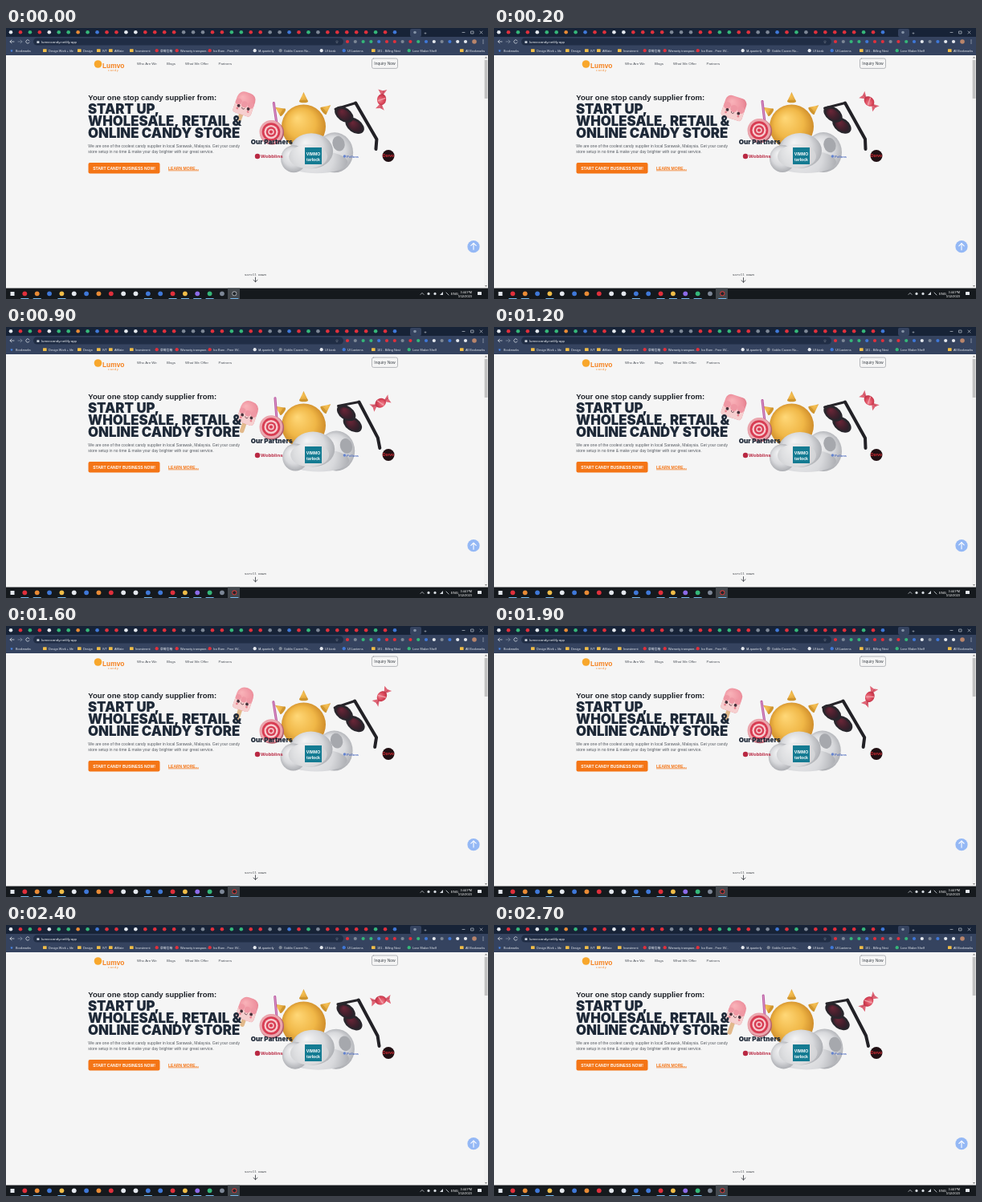
An HTML page with a canvas for the animation above (2.8 s loop, 600x338 px).

```html
<!DOCTYPE html>
<html lang="en">
<head>
<meta charset="utf-8">
<title>Candy supplier landing page</title>
<style>
html, body { margin: 0; width: 100%; height: 100%; overflow: hidden; background: #f5f5f5; }
canvas { display: block; width: 600px; height: 338px; }
</style>
</head>
<body>
<canvas id="stage"></canvas>
<script>
const W = 600, H = 338, LOOP = 2800, STEP = 100;
const canvas = document.getElementById('stage');
const ctx = canvas.getContext('2d');
const ratio = window.devicePixelRatio || 1;
canvas.width = W * ratio;
canvas.height = H * ratio;

const SANS = '"Liberation Sans", Arial, sans-serif';
const WIDE = 'Inter, sans-serif';
const MONO = '"Liberation Mono", monospace';
const mix = (a, b, k) => a + (b - a) * k;

function text(str, x, y, size, color, { weight = 400, family = SANS, align = 'left' } = {}) {
  ctx.font = `${weight} ${size}px ${family}`;
  ctx.textAlign = align;
  ctx.fillStyle = color;
  ctx.fillText(str, x, y);
}
function rect(x, y, w, h, color, radius = 0) {
  ctx.fillStyle = color;
  ctx.beginPath();
  ctx.roundRect(x, y, w, h, radius);
  ctx.fill();
}
function oval(x, y, rx, ry, fill, angle = 0) {
  ctx.fillStyle = fill;
  ctx.beginPath();
  ctx.ellipse(x, y, rx, ry, angle, 0, Math.PI * 2);
  ctx.fill();
}
const dot = (x, y, r, fill) => oval(x, y, r, r, fill);
function line(points, color, width) {
  ctx.strokeStyle = color;
  ctx.lineWidth = width;
  ctx.lineCap = ctx.lineJoin = 'round';
  ctx.beginPath();
  points.forEach(([x, y], i) => i ? ctx.lineTo(x, y) : ctx.moveTo(x, y));
  ctx.stroke();
}
function polygon(points, fill) {
  ctx.fillStyle = fill;
  ctx.beginPath();
  points.forEach(([x, y]) => ctx.lineTo(x, y));
  ctx.closePath();
  ctx.fill();
}
function shade(x, y, r, light, mid, dark) {
  const g = ctx.createRadialGradient(x - r * 0.3, y - r * 0.4, 0, x, y, r * 1.1);
  g.addColorStop(0, light);
  g.addColorStop(0.6, mid);
  g.addColorStop(1, dark);
  return g;
}
function placed(x, y, angle, draw) {
  ctx.save();
  ctx.translate(x, y);
  ctx.rotate(angle);
  draw();
  ctx.restore();
}

const ICON = { r: '#e0303c', g: '#35b779', w: '#e4e8ee', o: '#e98b35', b: '#3f78d8', n: '#7d8796', y: '#f0bd48', p: '#8c6be8' };
const TABS = 'wrgrwggogbrrwwrrrrnnnrrggrrnnbrgnrrrrrgrb';
const TASKS = 'wrobywborwwbbrypgnw';

function drawBrowser() {
  rect(0, 0, W, 11, '#172337');
  [...TABS].forEach((key, i) => dot(6 + i * 11.95, 5.3, 2.3, ICON[key]));
  rect(503, 1, 14, 10, '#35435f', 2);
  dot(509, 5.5, 1.8, '#8391a5');
  text('+', 522, 7.5, 6, '#d6dce5', { align: 'center' });
  line([[568, 5.5], [571, 5.5]], '#d6dce5', 0.6);
  ctx.strokeRect(579, 4, 3, 3);
  line([[590, 4], [593, 7]], '#d6dce5', 0.6);
  line([[593, 4], [590, 7]], '#d6dce5', 0.6);

  rect(0, 11, W, 23, '#35435f');
  rect(34, 12.5, 386, 9, '#202d45', 4.5);
  line([[5, 17], [10, 17]], '#e4e8ee', 0.7);
  line([[7, 15], [5, 17], [7, 19]], '#e4e8ee', 0.7);
  line([[15, 17], [20, 17]], '#8794a7', 0.7);
  line([[18, 15], [20, 17], [18, 19]], '#8794a7', 0.7);
  ctx.strokeStyle = '#e4e8ee';
  ctx.beginPath();
  ctx.arc(27, 17, 2.2, 0.5, 5.8);
  ctx.stroke();
  rect(38.4, 16.3, 3, 2.6, '#c9d0da', 0.5);
  text('lumvocandy.netlify.app', 44, 18.7, 4.4, '#eef1f5');
  text('☆', 412, 19, 5, '#d6dce5', { align: 'center', family: '"DejaVu Sans", sans-serif' });
  [...'rnggbrrnrgbwnbww'].forEach((key, i) => dot(425 + i * 9.8, 17, 2.1, ICON[key]));
  dot(583, 17, 2.8, '#b9856b');
  for (let i = 0; i < 3; i++) dot(594, 15 + i * 2, 0.6, '#e4e8ee');

  text('★', 7, 29.5, 5, '#4c8df5', { align: 'center', family: '"DejaVu Sans", sans-serif' });
  const marks = [
    [12, 'Bookmarks'], [53, 'Design Work + life', 'y'], [96, 'Design', 'y'], [120, 'IVT', 'y'],
    [135, 'Affilate', 'y'], [161, 'Investment', 'y'], [192, '草莓信箱', 'r'],
    [217, 'Warranty transpare...', 'r'], [258, 'Ico Barn - Free SV...', 'r'], [314, 'IA quarterly', 'w'],
    [346, 'Goblin Cavern No...', 'n'], [397, 'UI kiosk', 'w'], [425, 'UI Lanterns', 'b'],
    [462, '101 - Billing Nest', 'y'], [506, 'Lone Maker Shelf', 'g'], [572, 'All Bookmarks', 'y']
  ];
  for (const [x, label, key] of marks) {
    if (key === 'y') rect(x - 7, 26.3, 4.6, 3.7, ICON.y, 0.5);
    else if (key) dot(x - 4.3, 28.2, 2.1, ICON[key]);
    text(label, x, 29.5, 3.8, '#e4e8ee', { family: '"Liberation Sans", "Noto Sans CJK SC", "Noto Sans CJK", sans-serif' });
  }
  rect(595, 34, 5, 291, '#f1f1f1');
  rect(595.7, 40, 3.8, 48, '#c1c1c1');
  polygon([[596, 37.5], [599, 37.5], [597.5, 35.8]], '#777');
  polygon([[596, 321], [599, 321], [597.5, 322.8]], '#777');
}

function drawTaskbar(recording) {
  rect(0, 324.5, W, 13.5, '#15191d');
  rect(276, 324.5, 15, 13.5, '#43484d');
  [...TASKS].forEach((key, i) => {
    const x = 8 + i * 15.35;
    if (i === 0) rect(x - 2.5, 329, 5, 5, ICON.w);
    else if (i < TASKS.length - 1) dot(x, 331.3, 2.9, ICON[key]);
    else {
      dot(x, 331.3, 3, recording ? '#d93a3a' : '#a4a8ad');
      dot(x, 331.3, 2.1, '#20262c');
    }
    if ([1, 2, 4, 11, 13, 14, 15, 16, 18].includes(i)) rect(x - 5, 337, 10, 1, '#76b9ed');
  });
  line([[516, 332.4], [518, 330.4], [520, 332.4]], '#e4e8ee', 0.7);
  dot(526, 331.4, 1.6, '#d7dce2');
  dot(534, 331.4, 1.6, '#d7dce2');
  polygon([[540, 333], [544, 333], [544, 329]], '#d7dce2');
  line([[548, 330], [551, 333]], '#d7dce2', 0.8);
  text('ENG', 554, 333, 4.2, '#fff');
  text('3:44 PM', 580, 330.7, 3.9, '#fff', { align: 'right' });
  text('5/12/2023', 580, 336.2, 3.9, '#fff', { align: 'right' });
  rect(587, 329, 5, 4, '#e4e8ee', 0.6);
}

function drawCopy() {
  dot(114.5, 45, 4.8, '#f8a72c');
  text('Lumvo', 120, 49.7, 8.4, '#f58220', { weight: 700 });
  text('c a n d y', 127, 53.6, 3.4, '#f58220');
  [['Who Are We', 163], ['Blogs', 200], ['What We Offer', 223], ['Partners', 264.5]]
    .forEach(([label, x]) => text(label, x, 45.7, 4.4, '#4b5159'));
  ctx.strokeStyle = '#9a9da1';
  ctx.lineWidth = 0.7;
  ctx.beginPath();
  ctx.roundRect(455.5, 38, 32, 12.4, 2);
  ctx.stroke();
  text('Inquiry Now', 471.5, 46, 5, '#3d434a', { align: 'center' });

  text('Your one stop candy supplier from:', 102.3, 90.3, 9.5, '#1c2027', { weight: 700 });
  ['START UP,', 'WHOLESALE, RETAIL &', 'ONLINE CANDY STORE'].forEach((row, i) =>
    text(row, 102, 107 + i * 15, 16.8, '#1e2938', { weight: 900, family: WIDE }));
  text('We are one of the coolest candy supplier in local Sarawak, Malaysia. Get your candy', 102.3, 148.6, 5.04, '#565b62');
  text('store setup in no time & make your day brighter with our great service.', 102.3, 156.2, 5.04, '#565b62');
  rect(102.5, 168, 89, 13.6, '#f47516', 2);
  text('START CANDY BUSINESS NOW!', 147, 176.7, 5, '#fff', { weight: 700, align: 'center' });
  text('LEARN MORE...', 202, 176.7, 5, '#f47516', { weight: 700 });
  rect(202, 177.6, 38, 0.6, '#f47516');
}

function drawSun() {
  const x = 370.5, y = 123, r = 27.5;
  for (const angle of [-0.97, 0, 0.9]) {
    placed(x, y, angle, () => {
      polygon([[-5.5, -31.5], [0, -43], [5.5, -31.5]], shade(0, -36, 7, '#f8c55a', '#e5aa3f', '#b97d20'));
      oval(0, -31.5, 5.5, 1.8, '#cf952e');
    });
  }
  dot(x, y, r, shade(x, y, r, '#ffd878', '#f0b747', '#c98525'));
}

function drawCloud(c) {
  const dx = -1.5 * c, dy = 0.6 * c;
  const lobe = (x, y, rx, ry) => oval(x + dx, y + dy, rx, ry, shade(x + dx, y + dy, Math.max(rx, ry), '#f4f4f5', '#d8d9dc', '#a4a6ab'));
  lobe(410, 155, 23, 25);
  lobe(388, 167, 38, 14);
  lobe(381, 153, 27, 22);
  lobe(359, 163, 16, 17);
  oval(377 + dx, 160 + dy, 24, 15, shade(377 + dx, 158 + dy, 24, '#eeeeef', '#dedfe1', '#cecfd2'));
  oval(418 + dx * 4.5, 146 - 3 * c, 7.5, 9.5, '#a6a8ad', -0.3);
}

function drawGlasses(s) {
  const at = (a, b) => [mix(a[0], b[0], s), mix(a[1], b[1], s)];
  const hinge = at([434, 93.5], [440, 93.5]);
  const bend = at([461, 139], [463, 138]);
  const tip = at([459, 151], [466, 151]);
  line([at([409, 102], [414, 98]), hinge], '#252328', 3);
  line([hinge, bend, tip], '#222126', 4);
  for (const [x, y] of [at([435, 122], [431, 121]), at([420, 108], [424, 107])]) {
    oval(x, y, 13, 8.5, '#29262c', 0.62);
    oval(x, y + 0.4, 10, 6, shade(x, y, 10, '#6d2638', '#40202c', '#27202a'), 0.62);
  }
}

function drawLollipop(c) {
  const y = 127.5 + 3.5 * c, lean = 1.2 * c;
  const stick = [[334 - lean, y - 36], [337, y - 10]];
  line(stick, '#b8579f', 3);
  line(stick, '#dd9ccc', 1);
  const x = 330;
  dot(x + 1, y + 1, 15, '#b4606e');
  dot(x, y, 14.5, '#eba6ae');
  [[11.3, '#d83c52'], [8.6, '#f7c9cd'], [6.2, '#d83c52'], [3.8, '#f4c3c9'], [2.1, '#d83c52']]
    .forEach(([r, color]) => dot(x, y, r, color));
}

// Turning towards the viewer widens the body and hides the stick.
function drawPopsicle(c) {
  const flat = 1 - Math.abs(c);
  const w = mix(21, 27, flat), h = mix(29, 28, flat);
  placed(299 - 3 * c, 99.5 - 9 * c, 0.33, () => {
    rect(-2.7, h / 2 - 3, 5.4, 15 * (1 - flat) + 3, '#e2b98b', 2.5);
    const round = mix(10, 7, flat);
    rect(-w / 2, -h / 2, w, h, shade(0, 0, 18, '#f9b3b9', '#ee929f', '#d9717f'), [round, round, 4, 4]);
    rect(-w / 2, 0, w, h / 2, '#f6cfcf', [1, 1, 4, 4]);
    for (let i = 0; i < 3; i++) dot(-w / 2 + w * (i + 0.5) / 3, i % 2, w / 6, '#ef98a4');
    for (const side of [-1, 1]) {
      dot(side * w * 0.27, 5, 1.9, '#46303a');
      dot(side * w * 0.3, 8.5, 1.4, '#e98491');
    }
    ctx.strokeStyle = '#64404a';
    ctx.lineWidth = 0.8;
    ctx.beginPath();
    ctx.arc(0, 5.5, 1.8, 0.2, Math.PI - 0.2);
    ctx.stroke();
  });
}

function drawCandy(c, s) {
  placed(467 + c, 91.5 - 4 * c, -Math.PI * (0.25 + s), () => {
    for (const side of [-1, 1]) {
      polygon([[side * 4, 0], [side * 12, -6], [side * 11, 0], [side * 13, 5]], '#df6475');
      line([[side * 5, 0], [side * 11, 1]], '#b83d52', 0.7);
    }
    oval(0, 0, 7, 5.6, shade(0, 0, 7, '#f18491', '#d94659', '#b42e43'));
    line([[-2, -4], [2, 4]], '#f1a1aa', 1.3);
  });
}

function drawPartners() {
  text('Our Partners', 304.7, 145.2, 8.1, '#1e2938', { weight: 900, family: WIDE });
  dot(313, 160, 3.2, '#b92943');
  text('Wobblins', 317, 162.2, 6.2, '#b92943', { weight: 700 });
  rect(372, 149, 21, 21, '#147b92');
  text('VIMMO', 382.5, 158.5, 5.2, '#fff', { weight: 700, align: 'center' });
  text('tarlock', 382.5, 165.5, 5.2, '#fff', { weight: 700, align: 'center' });
  dot(421.5, 160, 1.8, '#6685cf');
  text('Pellora', 424, 161.7, 4.4, '#526fc0', { weight: 700 });
  dot(476, 159.5, 7.5, '#211014');
  text('Dorvo', 476, 161.2, 4.8, '#df2c35', { weight: 700, align: 'center' });
}

function drawScrollHints(c) {
  text('Scroll Down', 310.5, 308.7, 4.1, '#30343a', { align: 'center', family: MONO });
  const y = 314.3 - 0.8 * c;
  line([[310.5, y - 2.8], [310.5, y + 2.8]], '#30343a', 0.8);
  line([[308, y + 0.5], [310.5, y + 2.8], [313, y + 0.5]], '#30343a', 0.8);
  const by = 272.7, lift = by - 0.7 * c;
  dot(582, by, 7.6, '#94b8f5');
  line([[582, lift + 4], [582, lift - 4]], '#fff', 1.1);
  line([[578.8, lift - 0.9], [582, lift - 4], [585.2, lift - 0.9]], '#fff', 1.1);
}

function render(now) {
  const t = Math.floor((now % LOOP) / STEP) * STEP;
  const c = Math.cos(Math.PI * (t - 1700) / 1000);
  const s = (1 - c) / 2;
  ctx.setTransform(ratio, 0, 0, ratio, 0, 0);
  rect(0, 0, W, H, '#f5f5f5');
  drawPopsicle(c);
  drawSun();
  drawCloud(c);
  drawGlasses(s);
  drawLollipop(c);
  drawCandy(c, s);
  drawCopy();
  drawPartners();
  drawScrollHints(c);
  drawBrowser();
  drawTaskbar(t >= STEP);
}

let start;
function frame(now) {
  start ??= now;
  render(Math.max(0, now - start));
  requestAnimationFrame(frame);
}
render(0);
requestAnimationFrame(frame);
</script>
</body>
</html>
```
